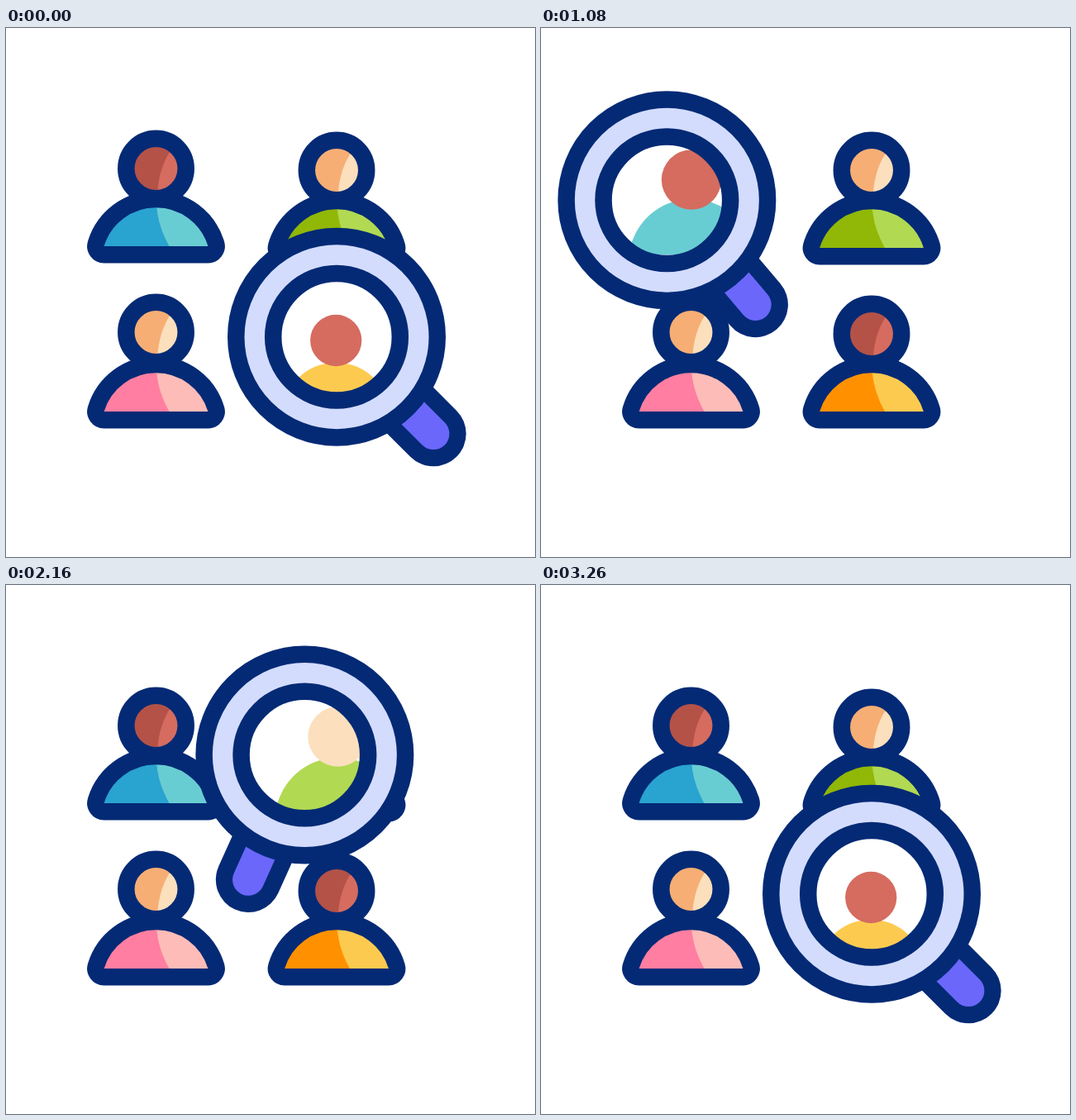
An HTML page for the animation above (3420 ms loop, 640x640 px).

```html
<!DOCTYPE html>
<html lang="en">
<head>
<meta charset="utf-8">
<title>People search</title>
<style>
html, body { margin: 0; width: 100%; height: 100%; overflow: hidden; background: #fff; }
svg { display: block; width: 100vw; height: 100vh; }
.line { fill: none; stroke: #042a75; stroke-width: 20.5; stroke-linejoin: round; }
</style>
</head>
<body>
<svg id="stage" viewBox="0 0 640 640">
  <defs>
    <path id="body" d="M-62.9 104.25A10.25 10.25 0 0 1 -72.7 91.1A75.9 75.9 0 0 1 72.7 91.1A10.25 10.25 0 0 1 62.9 104.25Z"/>
    <path id="bodyShade" d="M.5 42.7Q2 72 19 99H-68.6A70 70 0 0 1 .5 42.7Z"/>
    <path id="headShade" d="M20 -25Q3 -2 1.6 32A32 32 0 1 1 20 -25Z"/>
    <clipPath id="glass"><circle id="hole" r="72"/></clipPath>
  </defs>
  <g id="people"></g>
  <g id="lens">
    <g id="handle" fill="none" stroke-linecap="round">
      <path d="M0 0H165.7" stroke="#042a75" stroke-width="79"/>
      <path d="M0 0H165.7" stroke="#6a67fa" stroke-width="38.5"/>
    </g>
    <circle r="121.75" fill="#d3dcfd"/>
    <circle class="line" r="121.75"/>
    <circle r="76.8" fill="#fff"/>
  </g>
  <g clip-path="url(#glass)"><g id="views"></g></g>
  <circle id="rim" class="line" r="76.8"/>
</svg>
<script>
const $ = id => document.getElementById(id);

// x, y: head centre; drop: extra body offset; view: head and body as seen through the glass
const people = [
  { x: 181.5, y: 170, drop: 0, skin: ['#d56c5f', '#b45248'], shirt: ['#68cdd2', '#29a3cf'],
    view: { x: 182, head: 183.5, body: 170, k: 1 } },
  { x: 400, y: 172, drop: 0, skin: ['#fcdfbc', '#f6ae74'], shirt: ['#b1d952', '#91b707'],
    view: { x: 401.5, head: 183.5, body: 172, k: 1 } },
  { x: 181.5, y: 368, drop: 2, skin: ['#fcdfbc', '#f6ae74'], shirt: ['#fdbcb7', '#ff7ea1'],
    view: { x: 182, head: 382, body: 370, k: 1 } },
  { x: 400, y: 370, drop: 0, skin: ['#d56c5f', '#b45248'], shirt: ['#fdca50', '#ff9100'],
    view: { x: 399.2, head: 378, body: 372.8, k: 0.86 } }
];

const person = ({ x, y, drop, skin, shirt }) => `
  <g transform="translate(${x} ${y})">
    <g transform="translate(0 ${drop})">
      <use href="#body" fill="${shirt[0]}"/>
      <use href="#bodyShade" fill="${shirt[1]}"/>
      <use href="#body" class="line"/>
    </g>
    <circle r="36.2" fill="${skin[0]}"/>
    <use href="#headShade" fill="${skin[1]}"/>
    <circle r="36.2" class="line"/>
  </g>`;

const view = ({ skin, shirt, view: v }) => `
  <use href="#body" fill="${shirt[0]}" transform="translate(${v.x} ${v.body}) scale(${v.k})"/>
  <circle cx="${v.x}" cy="${v.head}" r="${36.2 * v.k}" fill="${skin[0]}"/>`;

$('people').innerHTML = people.map(person).join('');
$('views').innerHTML = people.map(view).join('');

const LOOP = 3420;
const stops = [
  { x: 400, y: 373.7, turn: 45 },
  { x: 179.5, y: 174.5, turn: 45 },
  { x: 170.5, y: 384.2, turn: 68.1 },
  { x: 400.5, y: 193.5, turn: 119.9 }
];

// out and into: curve handles leaving one stop and reaching the next
const moves = [
  { start: 0, time: 720, spin: 720, out: [-25, -50], into: [-78, -7] },
  { start: 900, time: 620, spin: 620, out: [-57.6, 36], into: [37, 33] },
  { start: 1700, time: 620, spin: 580, out: [25, -60], into: [71, -7] },
  { start: 2500, time: 760, spin: 760, out: [21, -20], into: [0, 20] }
];

const ease = u => {
  u = Math.min(1, Math.max(0, u));
  return u * u * (3 - 2 * u);
};

const curve = (a, b, out, into, p) => {
  const q = 1 - p;
  return q * q * q * a + 3 * q * q * p * (a + out) + 3 * q * p * p * (b - into) + p * p * p * b;
};

function draw(ms) {
  const t = ms % LOOP;
  const i = moves.findLastIndex(m => t >= m.start);
  const m = moves[i], a = stops[i], b = stops[(i + 1) % stops.length];
  const p = ease((t - m.start) / m.time);
  const x = curve(a.x, b.x, m.out[0], m.into[0], p);
  const y = curve(a.y, b.y, m.out[1], m.into[1], p);
  const turn = a.turn + (b.turn - a.turn) * ease((t - m.start) / m.spin);
  const place = `translate(${x} ${y})`;
  for (const id of ['lens', 'hole', 'rim']) $(id).setAttribute('transform', place);
  $('handle').setAttribute('transform', `rotate(${turn})`);
}

const begin = performance.now();
function tick() {
  draw(performance.now() - begin);
  requestAnimationFrame(tick);
}
tick();
</script>
</body>
</html>
```
